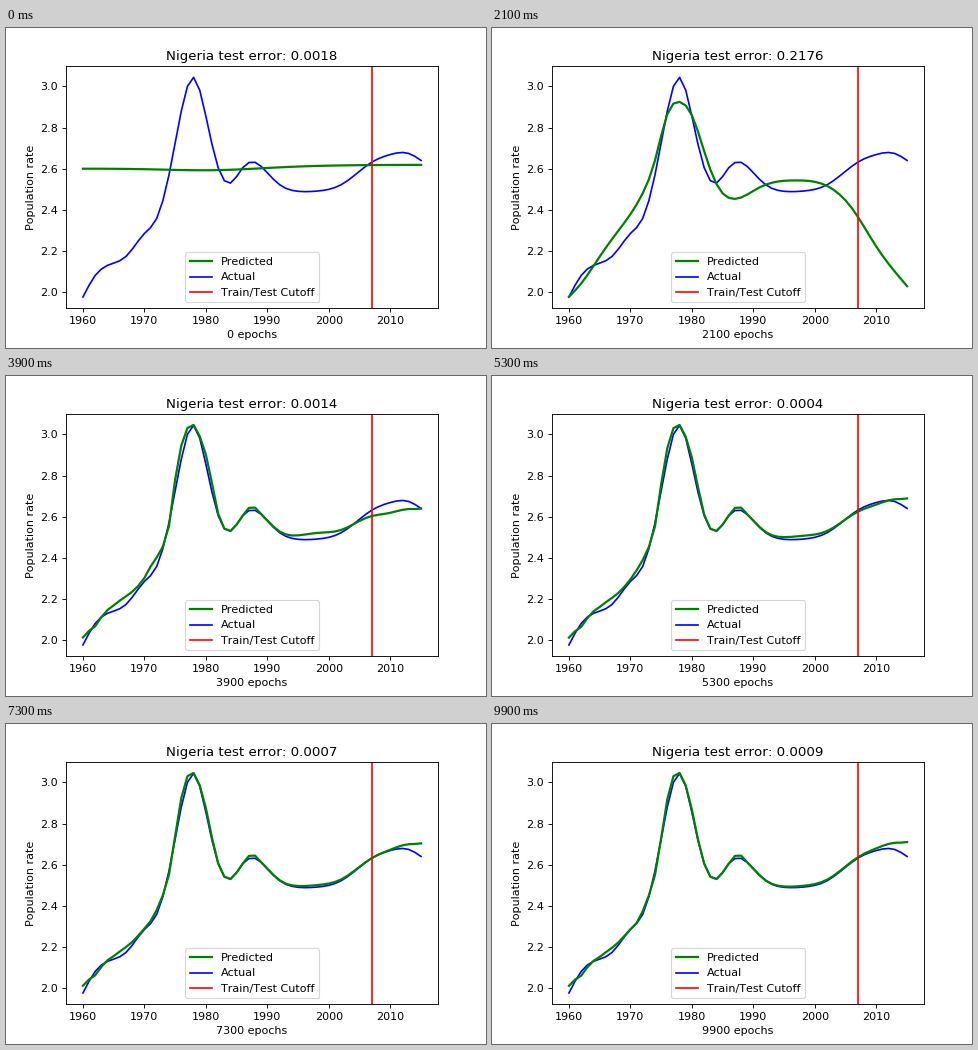
Recreate the animation shown at these times as a matplotlib script. Size 480 by 320 pixels, loop 10000 ms.

```python
import numpy as np
import matplotlib.pyplot as plt
from matplotlib.animation import FuncAnimation

plt.rcParams["font.family"] = "DejaVu Sans"
plt.rcParams["text.kerning_factor"] = 6

FRAMES, INTERVAL, STEP = 100, 100, 100
CUTOFF = 2007
years = np.arange(1960, 2016)
tested = years >= CUTOFF - 1


def spline(*points):
    """Natural cubic spline through (year, value) points, at every year."""
    x, y = np.array(points).T
    h = np.diff(x)
    s = np.diff(y) / h
    a, b = np.eye(len(x)), np.zeros(len(x))
    for i in range(1, len(x) - 1):
        a[i, i - 1:i + 2] = h[i - 1], 2 * (h[i - 1] + h[i]), h[i]
        b[i] = 6 * (s[i] - s[i - 1])
    m = np.linalg.solve(a, b)
    i = np.clip(np.searchsorted(x, years, side="right") - 1, 0, len(h) - 1)
    t = years - x[i]
    slope = s[i] - h[i] * (2 * m[i] + m[i + 1]) / 6
    return y[i] + t * (slope + t * (m[i] / 2
                                    + t * (m[i + 1] - m[i]) / (6 * h[i])))


def step(center, width):
    return 1 / (1 + np.exp((center - years) / width))


def hill(center, width, height):
    return height * np.exp(-((years - center) / width) ** 2)


def blend(past, future):
    """Between settled and close, with its own weight at each end."""
    return settled + np.interp(years, [1980, 2015], [past, future]) * gap


def pace(epoch):
    return np.log1p(np.asarray(epoch) / 1000)


actual = spline(
    (1960, 1.976), (1962, 2.081), (1964, 2.130), (1967, 2.173),
    (1970, 2.285), (1972, 2.358), (1974, 2.570), (1976, 2.880),
    (1978, 3.044), (1980, 2.855), (1982, 2.605), (1984, 2.530),
    (1986, 2.605), (1988, 2.631), (1990, 2.580), (1992, 2.522),
    (1995, 2.490), (1998, 2.491), (2002, 2.522), (2007, 2.632),
    (2010, 2.669), (2013, 2.674), (2015, 2.640))

# Stages of the fit: untrained, one bump, overshooting, close, settled
flat = 2.6 + .019 * step(1992, 6) - hill(1981, 10, .01)

bump = (2.436 + .228 * step(1971.9, 1.35) - .2665 * step(1985.5, 1.75)
        - hill(1966, 3.5, .016))

drift = spline(
    (1960, 1.977), (1962, 2.042), (1965, 2.172), (1968, 2.297),
    (1972, 2.480), (1974, 2.640), (1976, 2.865), (1978, 2.925),
    (1980, 2.860), (1982, 2.685), (1984, 2.525), (1987, 2.453),
    (1991, 2.509), (1997, 2.543), (2002, 2.516), (2006, 2.409),
    (2010, 2.221), (2015, 2.029))

settled = (actual + .07 * np.exp((years - 2015) / 2.6)
           + hill(1960, 1, .035) - hill(1962.2, 1, .022)
           + hill(1966.6, 1.8, .024) + hill(1972.2, .9, .016)
           - hill(1974, .6, .02) + hill(1976.4, .9, .046)
           + hill(1980, .9, .013) + hill(1987.5, .8, .019)
           + hill(1999, 6, .006))

gap = (hill(1966, 4, .018) + hill(1971.3, 1.1, .04) + hill(1975.3, .8, .06)
       + hill(1980.6, 1.1, .046) + hill(1998, 4.5, .024)
       - .071 * step(2007.2, 1.6))

epochs = STEP * np.arange(FRAMES)
marks = [0, 1100, 2100, 3900, 5300, 7300, 9900]
stages = [flat, bump, drift, blend(1, 1), blend(.55, .3), blend(.22, .09),
          settled]
weights = [np.interp(pace(epochs), pace(marks), row)
           for row in np.eye(len(marks))]
fits = np.transpose(weights) @ np.array(stages)
errors = ((fits - actual)[:, tested] ** 2).mean(axis=1)

fig, ax = plt.subplots(figsize=(6, 4), dpi=80)
fig.subplots_adjust(left=.125, right=.9, bottom=.125, top=.88)
predicted, = ax.plot(years, fits[0], color="g", lw=2, zorder=2.2,
                     label="Predicted")
ax.plot(years, actual, color="b", lw=1.5, label="Actual")
ax.axvline(CUTOFF, color="r", lw=1.5, zorder=2.4, label="Train/Test Cutoff")
ax.set_xlim(1957.25, 2017.75)
ax.set_ylim(1.9226, 3.0974)
ax.set_xticks(range(1960, 2011, 10))
ax.set_yticks(np.linspace(2, 3, 6))
ax.set_ylabel("Population rate")
ax.legend(loc="lower center")


def update(i):
    predicted.set_ydata(fits[i])
    ax.set_title(f"Nigeria test error: {errors[i]:.4f}")
    ax.set_xlabel(f"{epochs[i]} epochs")
    return predicted,


anim = FuncAnimation(fig, update, frames=FRAMES, interval=INTERVAL,
                     repeat=True, repeat_delay=0)
plt.show()
```
